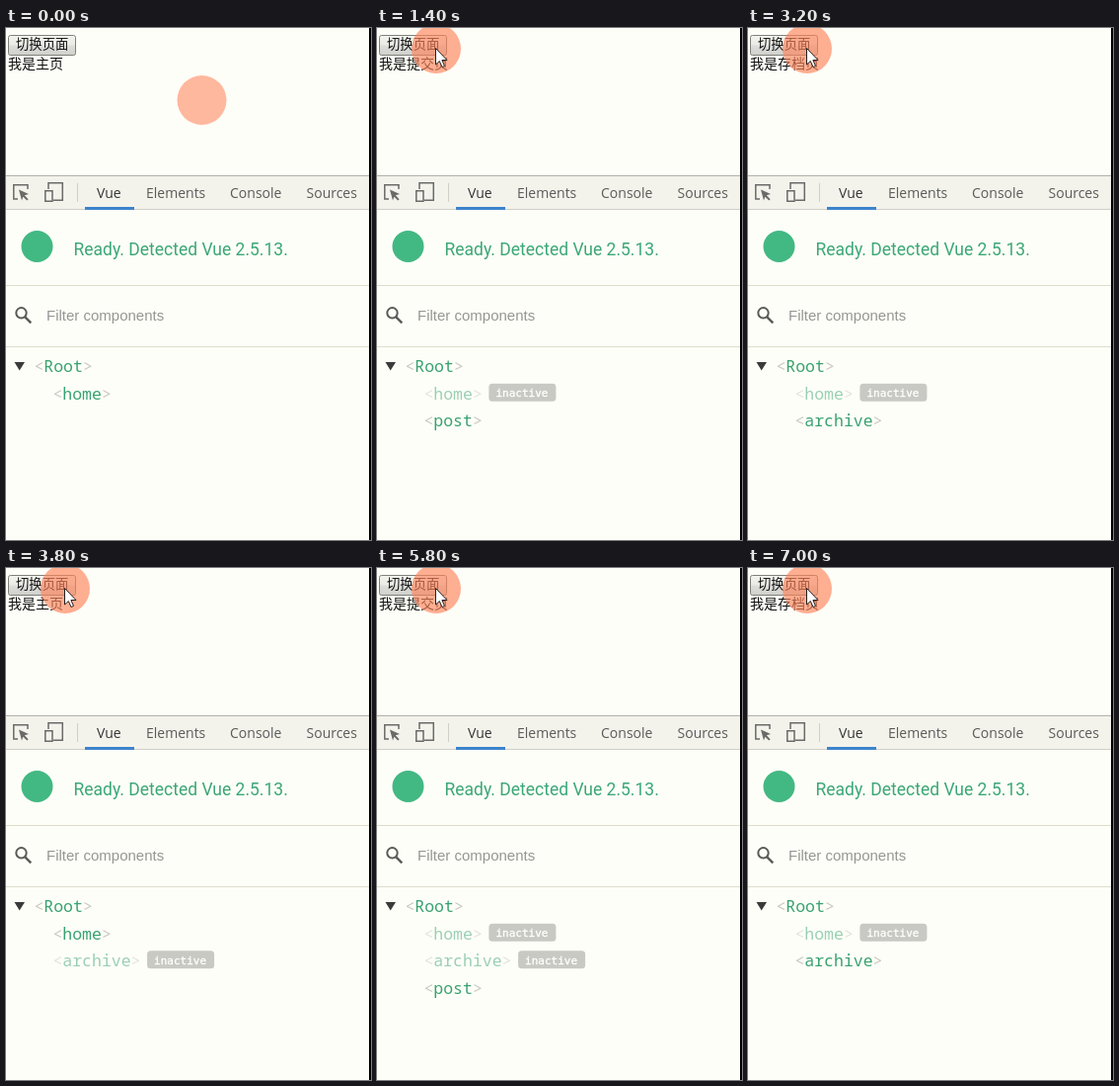
Write an HTML page that moves like this. It is 370 px wide and 518 px high and loops after 7.2 s.

```html
<!DOCTYPE html>
<html lang="zh">
<head>
<meta charset="utf-8">
<style>
html, body { margin: 0; width: 100%; height: 100%; overflow: hidden; background: #fefef8; }
svg { display: block; }
text { white-space: pre; }
.cjk { font-family: "Noto Sans CJK SC", "Noto Sans CJK", sans-serif; fill: #111; }
.tab { font: 14px "Open Sans", sans-serif; fill: #5a5a58; }
.tag { font: 16.5px "Noto Sans Mono", monospace; fill: #38a270; }
.tag .b { fill: #c8c8c0; }
.badge { font: 500 11px "DejaVu Sans Mono", monospace; fill: #fff; stroke: #fff; stroke-width: .3; }
.icon { fill: none; stroke: #6a6a68; stroke-width: 1.5; }
</style>
</head>
<body>
<svg width="370" height="518" viewBox="0 0 370 518">
  <defs>
    <linearGradient id="face" x2="0" y2="1">
      <stop offset="0" stop-color="#f4f4ee"/>
      <stop offset=".48" stop-color="#ebebe6"/>
      <stop offset=".52" stop-color="#dddddb"/>
      <stop offset="1" stop-color="#d0d0cc"/>
    </linearGradient>
  </defs>
  <rect width="370" height="518" fill="#fefef8"/>

  <rect x="2.5" y="7.5" width="68" height="20" rx="2" fill="url(#face)" stroke="#80807a"/>
  <text class="cjk" x="10" y="21.3" font-size="13.33">切换页面</text>
  <text class="cjk" id="page" x="2" y="40.5" font-size="14"></text>

  <rect y="149" width="368" height="35" fill="#f3f3ec"/>
  <path d="M0 149.5H368" stroke="#b2b2aa"/>
  <path d="M0 183.5H368M72.5 157V176" stroke="#d0d0c8"/>
  <g class="icon">
    <path d="M12 173H7.8V158.8H22V163"/>
    <path d="M13 163.5L23 168 18.8 169.3 22.6 173.2 21.2 174.6 17.4 170.8 16 174.5Z" fill="#6a6a68" stroke="none"/>
    <path d="M43 163V156.8H57.3V174.3H48M39.8 164.8H47V175.3H39.8Z"/>
  </g>
  <g class="tab">
    <text x="92" y="172" style="fill:#333">Vue</text>
    <text x="142" y="172">Elements</text>
    <text x="227" y="172">Console</text>
    <text x="304.5" y="172">Sources</text>
  </g>
  <rect x="80" y="181" width="50" height="3" fill="#3d83cc"/>

  <circle cx="31.5" cy="221" r="16" fill="#42b883"/>
  <text x="68.5" y="230" font-family="Roboto, sans-serif" font-size="17.5" fill="#3ba776">Ready. Detected Vue 2.5.13.</text>
  <path d="M0 260.5H368M0 322.5H368" stroke="#dedece"/>
  <path d="M19.3 292.3L25.3 298.3" stroke="#5a5a58" stroke-width="2.4"/>
  <circle cx="15.5" cy="288.3" r="5.2" fill="none" stroke="#5a5a58" stroke-width="2"/>
  <text x="41" y="296" font-family="'Liberation Sans', Arial, sans-serif" font-size="15" fill="#969692">Filter components</text>

  <path d="M8.5 338H19L13.7 346.5Z" fill="#3a3a3a"/>
  <g id="tree"></g>

  <circle id="halo" r="25" fill="#ff8258"/>
  <path id="pointer" d="M0 0V16.5L3.8 13 6.5 19 9 17.9 6.4 12H11.5Z" fill="#fff" stroke="#222"/>
  <rect x="368" width="2" height="518" fill="#000"/>
</svg>
<script>
const LOOP = 7200, STEP = 200, ARRIVE = 700, CHAR = 9.9;
const el = id => document.getElementById(id);
const titles = { home: "我是主页", post: "我是提交页", archive: "我是存档页" };

// Each click: time, active component, components kept in the tree
const clicks = [
  [0, "home", ["home"]],
  [1400, "post", ["home", "post"]],
  [2600, "archive", ["home", "archive"]],
  [3800, "home", ["home", "archive"]],
  [5000, "post", ["home", "archive", "post"]],
  [6800, "archive", ["home", "archive"]]
];

const tag = (name, x, y, opacity = 1) =>
  `<text class="tag" x="${x}" y="${y}" opacity="${opacity}"><tspan class="b">&lt;</tspan>${name}<tspan class="b">&gt;</tspan></text>`;

function badge(x, y) {
  return `<rect x="${x}" y="${y - 16}" width="68" height="18" rx="3.5" fill="#c9c9c3"/>` +
    `<text class="badge" x="${x + 7}" y="${y - 2.5}">inactive</text>`;
}

function tree(active, kept) {
  return tag("Root", 28.4, 348) + kept.map((name, i) => {
    const x = 47.4, y = 375.7 + 27.6 * i, off = name !== active;
    const end = x + (name.length + 2) * CHAR;
    return tag(name, x, y, off ? .5 : 1) + (off ? badge(end + 6.6, y) : "");
  }).join("");
}

function movePointer(t) {
  const p = Math.min(1, t / ARRIVE);
  const far = 1 - p * p * (3 - 2 * p);
  const x = 60 + 138.5 * far, y = 21 + 52 * far;
  el("halo").setAttribute("transform", `translate(${x} ${y})`);
  el("halo").setAttribute("opacity", t ? .64 : .56);
  el("pointer").setAttribute("transform", `translate(${x - .5} ${y - .5})`);
  el("pointer").setAttribute("visibility", t ? "visible" : "hidden");
}

let last = -1;
function draw(now) {
  const t = Math.floor(now % LOOP / STEP) * STEP;
  if (t !== last) {
    last = t;
    const [, active, kept] = clicks.filter(c => c[0] <= t).pop();
    el("page").textContent = titles[active];
    el("tree").innerHTML = tree(active, kept);
    movePointer(t);
  }
  requestAnimationFrame(draw);
}
requestAnimationFrame(draw);
</script>
</body>
</html>
```
